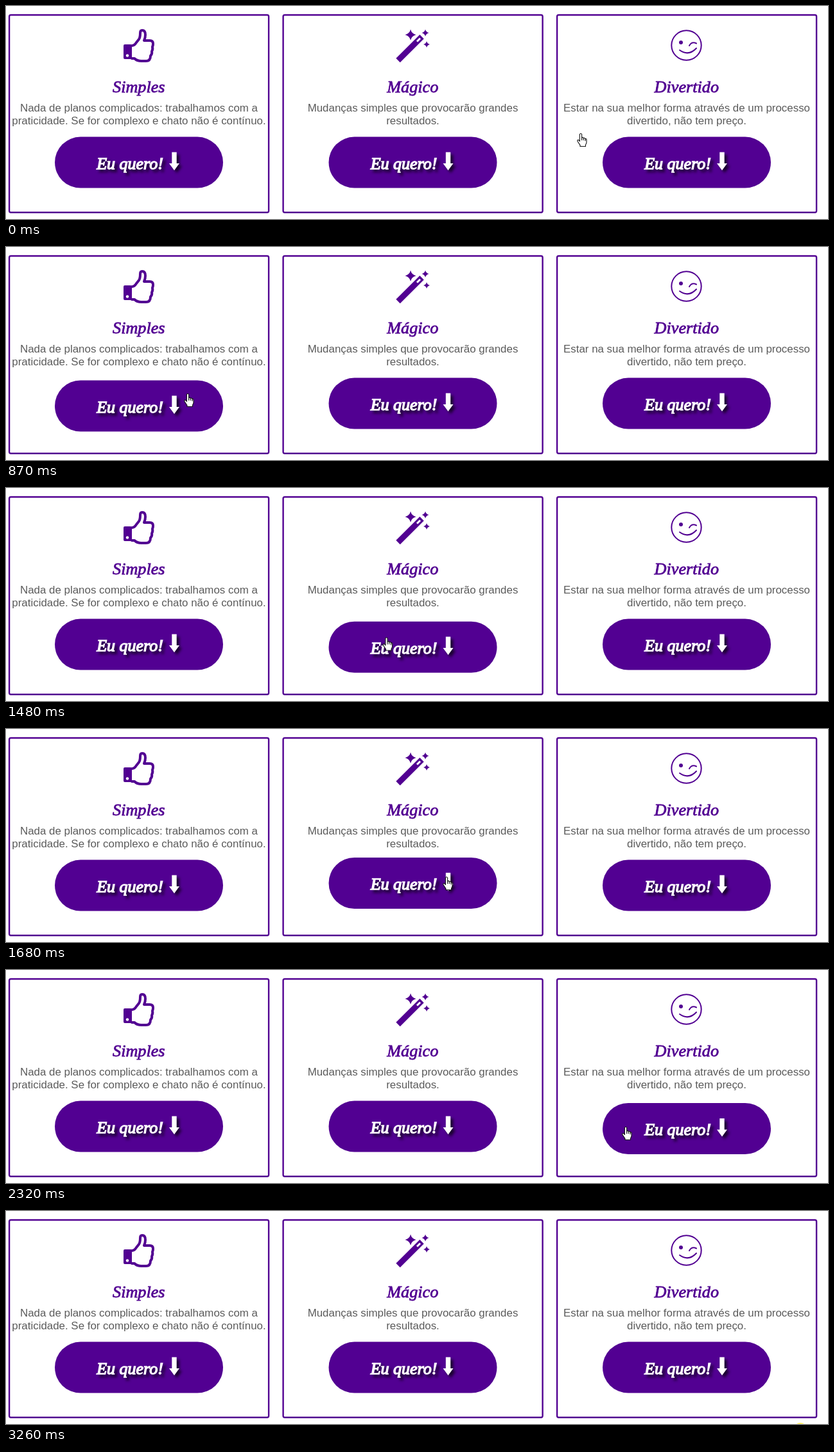
Write an HTML page that moves like this. It is 1280 px wide and 333 px high and loops after 3330 ms.

```html
<!DOCTYPE html>
<html lang="pt">
<head>
<meta charset="utf-8">
<style>
  html, body { margin: 0; width: 100%; height: 100%; overflow: hidden; background: #fff; }
  svg { display: block; width: 1280px; height: 333px; }
  text { text-anchor: middle; }
  .title, .label { font-family: "Liberation Serif", serif; font-style: italic; }
  .title { font-size: 26.2px; fill: #520092; stroke: #520092; stroke-width: .8; }
  .body { font: 16.9px "Liberation Sans", Arial, sans-serif; fill: #5b5b5b; }
  .label { font-size: 26px; fill: #fff; stroke: #fff; stroke-width: 1.4; }
  .face { filter: drop-shadow(4px 4px 2px rgba(0, 0, 0, .7)); }
  .line { fill: none; stroke: #520092; stroke-linecap: round; stroke-linejoin: round; }
  .pointer path { fill: #fff; stroke: #111; stroke-width: 1.1; stroke-linejoin: round; }
</style>
</head>
<body>
<svg id="stage" viewBox="0 0 1280 333">
  <g id="cards"></g>
  <circle id="spot" cx="1237" cy="341" r="10" fill="#fff36a"/>
  <g id="cursor" class="pointer">
    <g id="hand">
      <path d="M-1.6 1.5Q0-1 1.6 1.5V7Q3.4 5.4 4.3 7.8Q6 6.4 7 8.8Q9 8 9 10.2V14Q9 16 7.5 18V20.5H-1V18.6L-5 12.5Q-5.6 9.8-3.5 10.3L-1.6 12.5Z"/>
      <path d="M1.6 7V11M4.3 8V11M7 9V12" stroke-width=".8"/>
    </g>
    <path id="arrow" d="M0 0V16L3.8 12.5L6.2 18L8.8 16.9L6.4 11.5H11.5Z"/>
    <path id="beam" d="M-3-9Q0-9 0-7Q0-9 3-9M0-7V7M-3 9Q0 9 0 7Q0 9 3 9" style="fill:none"/>
  </g>
</svg>
<script>
const $ = id => document.getElementById(id);
const LOOP = 3330, PITCH = 426.5, PURPLE = '#520092';

const star = (x, y, r) =>
  `<path d="M${x} ${y - r}Q${x + r * .2} ${y - r * .2} ${x + r} ${y}Q${x + r * .2} ${y + r * .2} ${x} ${y + r}` +
  `Q${x - r * .2} ${y + r * .2} ${x - r} ${y}Q${x - r * .2} ${y - r * .2} ${x} ${y - r}Z" fill="${PURPLE}"/>`;

// Icons use the coordinates of the first card.
const thumb = `
  <rect x="183" y="60" width="13" height="23" rx="2" fill="${PURPLE}"/>
  <circle cx="189" cy="77.5" r="2.2" fill="#fff"/>
  <path class="line" stroke-width="4" d="M196 62Q200 62 203 57L207 52Q209 49 209 42Q209 38 212 38Q217 38 217 45Q217 50 215 54H224Q229 54 229 59Q229 62 228 64Q229 68 227 71Q228 75 225 78Q225 86 218 86H211Q204 86 200 82H196"/>`;

const wand = `
  <path d="M184 85L221 48" stroke="${PURPLE}" stroke-width="9"/>
  <path d="M213.5 55.5L218.5 50.5" stroke="#fff" stroke-width="3"/>
  ${star(203.5, 45, 8.5)}${star(226.5, 42, 5.5)}${star(228.5, 60, 5)}`;

const wink = `
  <circle class="line" cx="206.5" cy="61.5" r="23.2" stroke-width="2"/>
  <circle cx="198" cy="57" r="3" fill="${PURPLE}"/>
  <path class="line" stroke-width="2" d="M211 62Q215 55 222 58.5M196 69Q210 79 222 66"/>`;

const cards = [
  ['Simples', thumb, 'Nada de planos complicados: trabalhamos com a',
    'praticidade. Se for complexo e chato não é contínuo.'],
  ['Mágico', wand, 'Mudanças simples que provocarão grandes', 'resultados.'],
  ['Divertido', wink, 'Estar na sua melhor forma através de um processo',
    'divertido, não tem preço.'],
];

$('cards').innerHTML = cards.map(([title, icon, line1, line2], i) => `
  <g transform="translate(${i * PITCH})">
    <rect class="line" x="5.1" y="14" width="404" height="308.8" rx="2.5" stroke-width="2.4"/>
    ${icon}
    <text class="title" x="206.8" y="134.5">${title}</text>
    <text class="body" x="207" y="165">${line1}</text>
    <text class="body" x="207" y="184.5">${line2}</text>
    <g class="button">
      <rect x="76" y="204.6" width="262" height="80" rx="40" fill="${PURPLE}"/>
      <g class="face">
        <text class="label" x="193" y="255">Eu quero!</text>
        <path d="M258.3 228.5H265.7V246H270L262 257L254 246H258.3Z" fill="#fff"/>
      </g>
    </g>
  </g>`).join('');

const buttons = [...document.querySelectorAll('.button')];
const hovers = [[785, 1290], [1390, 2110], [2185, 2640]];   // enter, leave

// Time, x, y of the pointer's hot spot.
const path = [
  [0, 895, 199], [134, 780, 152], [268, 630, 130], [402, 450, 138], [536, 347, 157],
  [600, 318, 180], [734, 286, 203], [868, 283, 229], [1207, 283, 233], [1274, 325, 237],
  [1341, 425, 239], [1408, 530, 236], [1542, 655, 231], [1680, 686, 231], [2015, 753, 231],
  [2149, 900, 238], [2260, 965, 245], [2528, 1033, 266], [2595, 1050, 279],
];

function held(t) {
  const start = [2260, 1680, 1140, 600, 0].find(s => t >= s);
  return start + Math.floor((t - start) / 67) * 67;
}

// Damped vertical wobble over one second, eased between its turning points.
function wobble(t) {
  const stops = [0, 8, -6, 4, -2, 1, 0];
  const n = Math.floor(t * 6 / 1000);
  if (n < 0 || n > 5) return 0;
  const p = t * 6 / 1000 - n;
  return stops[n] + (stops[n + 1] - stops[n]) * p * p * (3 - 2 * p);
}

function position(t) {
  const next = path.findIndex(k => k[0] > t);
  if (next < 0) return path[path.length - 1].slice(1);
  const [a, b] = [path[next - 1], path[next]];
  const p = (t - a[0]) / (b[0] - a[0]);
  return [a[1] + (b[1] - a[1]) * p, a[2] + (b[2] - a[2]) * p];
}

function pointerKind(t, y) {
  if (t < 67 || hovers.some(([enter, leave]) => t >= enter && t < leave)) return 'hand';
  return y > 115 && y < 190 ? 'beam' : 'arrow';
}

const show = (id, on) => $(id).setAttribute('visibility', on ? 'visible' : 'hidden');

function draw(now) {
  const time = now % LOOP, t = held(time);
  buttons.forEach((button, i) => {
    const [enter, leave] = hovers[i];
    const y = t >= enter && t < leave ? wobble(t - enter) : 0;
    button.setAttribute('transform', `translate(0 ${y})`);
  });
  const [x, y] = position(t), kind = pointerKind(t, y);
  $('cursor').setAttribute('transform', `translate(${x} ${y})`);
  for (const id of ['hand', 'arrow', 'beam']) show(id, id === kind && t < 2640);
  show('spot', time >= 3260);
  requestAnimationFrame(() => draw(performance.now()));
}
draw(performance.now());
</script>
</body>
</html>
```
